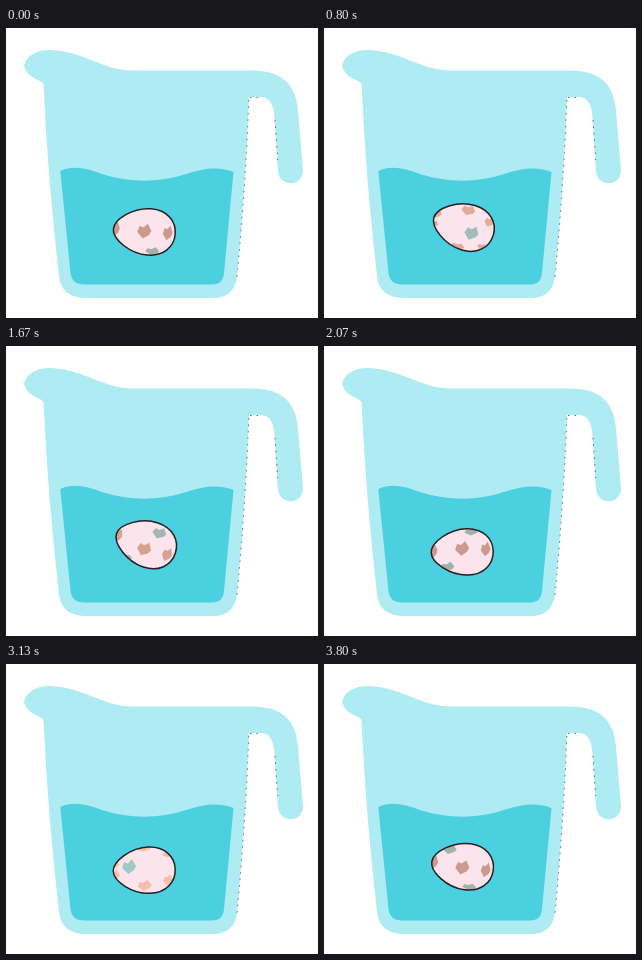
An HTML page that plays this animation: 312 px wide and 290 px high, repeating every 3.87 s.

```html
<!DOCTYPE html>
<html lang="en">
<head>
<meta charset="utf-8">
<title>Egg in a jug</title>
<style>
  html, body { margin: 0; width: 100%; height: 100%; overflow: hidden; background: #fff; }
  svg { display: block; width: 100vw; height: 100vh; }
</style>
</head>
<body>
<svg viewBox="0 0 312 290">
  <defs>
    <path id="shell" d="M-31 0C-31-10-13-23.2 5-23.2C21-23.2 31-13 31 0S21 23.2 5 23.2C-13 23.2-31 10-31 0Z"/>
    <clipPath id="inside"><use href="#shell"/></clipPath>
  </defs>
  <path fill="#aeebf3" d="M18 38C20 28 30 22 44 22C78 23 96 42.500 128 42.500H246C276 42.500 290 56 292 83L297 142C297 160 273 159 272 143L268.500 90C267.500 76 264 69 254 69H243Q239.500 160 231 249Q228 270 207 270H81Q55 270 53 248Q42 154 37.500 56C34 51 22 51 18 38Z"/>
  <path fill="#4ad0df" d="M54.300 143C67 137 81 140.500 96 146C124 155 153 155 180 146C198 139.500 215 138.500 227.500 144L218 245Q217 256.500 206 256.500H78Q66 256.500 64.500 245Z"/>
  <path fill="none" stroke="#333" stroke-width=".7" stroke-dasharray="1.500 5" d="M242.800 72Q239.500 160 231 249M244 69.500H256M269 92L271.700 132"/>
  <g id="egg">
    <use href="#shell" fill="#fce4ed"/>
    <g id="spots" clip-path="url(#inside)"></g>
    <use href="#shell" fill="none" stroke="#2b1d20" stroke-width="1.500"/>
  </g>
</svg>
<script>
const LOOP = 3870, FPS = 15, BOBS = 4;
const TURN = 220; // degrees the shell rolls per loop
const HEART = 'M-1 7L-7 1L-5-5L-1-4L3-8L7-1L5 3Z';
const WARM = [[204, 154, 140], [245, 191, 168]];
const COOL = [[163, 177, 174], [160, 200, 197]];

const { sin, cos, sqrt, floor, round, max, PI } = Math;
const egg = document.getElementById('egg');
const layer = document.getElementById('spots');
const spots = [];

function addSpot(along, angle, width, tint) {
  const path = document.createElementNS('http://www.w3.org/2000/svg', 'path');
  path.setAttribute('d', HEART);
  spots.push({ path: layer.appendChild(path), along, angle, width, tint });
}

// Two rings of warm hearts, with a cool heart between them
for (const ring of [0, 1]) {
  const angle = ring * TURN / 2;
  for (const side of [-1, 0, 1]) addSpot(side * 26.5 - 3 * side * side, angle, 1 - .3 * side * side, WARM);
  addSpot(ring ? -15 : 9.5, angle + 57, 1, COOL);
}

const mix = (pair, s) => `rgb(${pair[0].map((c, k) => round(c + (pair[1][k] - c) * s))})`;

// Half the egg's height at a distance along its axis
function radiusAt(along) {
  const d = (along - 4) / (along < 4 ? 35 : 27);
  return 23.2 * sqrt(1 - d * d);
}

// Poses change on ten-millisecond marks
const startOf = k => round(k * 100 / FPS) * 10;
function poseTime(t) {
  const k = floor((t + 5) * FPS / 1000);
  return startOf(startOf(k) > t ? k - 1 : k);
}

function draw(t) {
  const p = t / LOOP, a = 2 * PI * BOBS * p;
  const y = 201.5 + 2 * cos(a) + 3 * sin(a) + 1.6 * sin(2 * a) - 1.4 * sin(3 * a);
  const tilt = (205.5 - y) * 2.3;
  const x = 138.2 + tilt * tilt * .005;
  egg.setAttribute('transform', `translate(${x} ${y}) rotate(${tilt})`);

  const glow = (.5 + .5 * cos(4 * PI * (p - .3))) ** 2;
  for (const { path, along, angle, width, tint } of spots) {
    let turn = angle - p * TURN;
    if (turn < -TURN / 2) turn += TURN;
    const roll = turn * PI / 180, depth = cos(roll);
    path.style.display = depth > .25 ? '' : 'none';
    path.setAttribute('fill', mix(tint, glow));
    path.setAttribute('transform',
      `translate(${along} ${radiusAt(along) * sin(roll)}) scale(${width} ${max(depth, .25)})`);
  }
}

const begin = performance.now();
function tick() {
  draw(poseTime((performance.now() - begin) % LOOP));
  requestAnimationFrame(tick);
}
tick();
</script>
</body>
</html>
```
